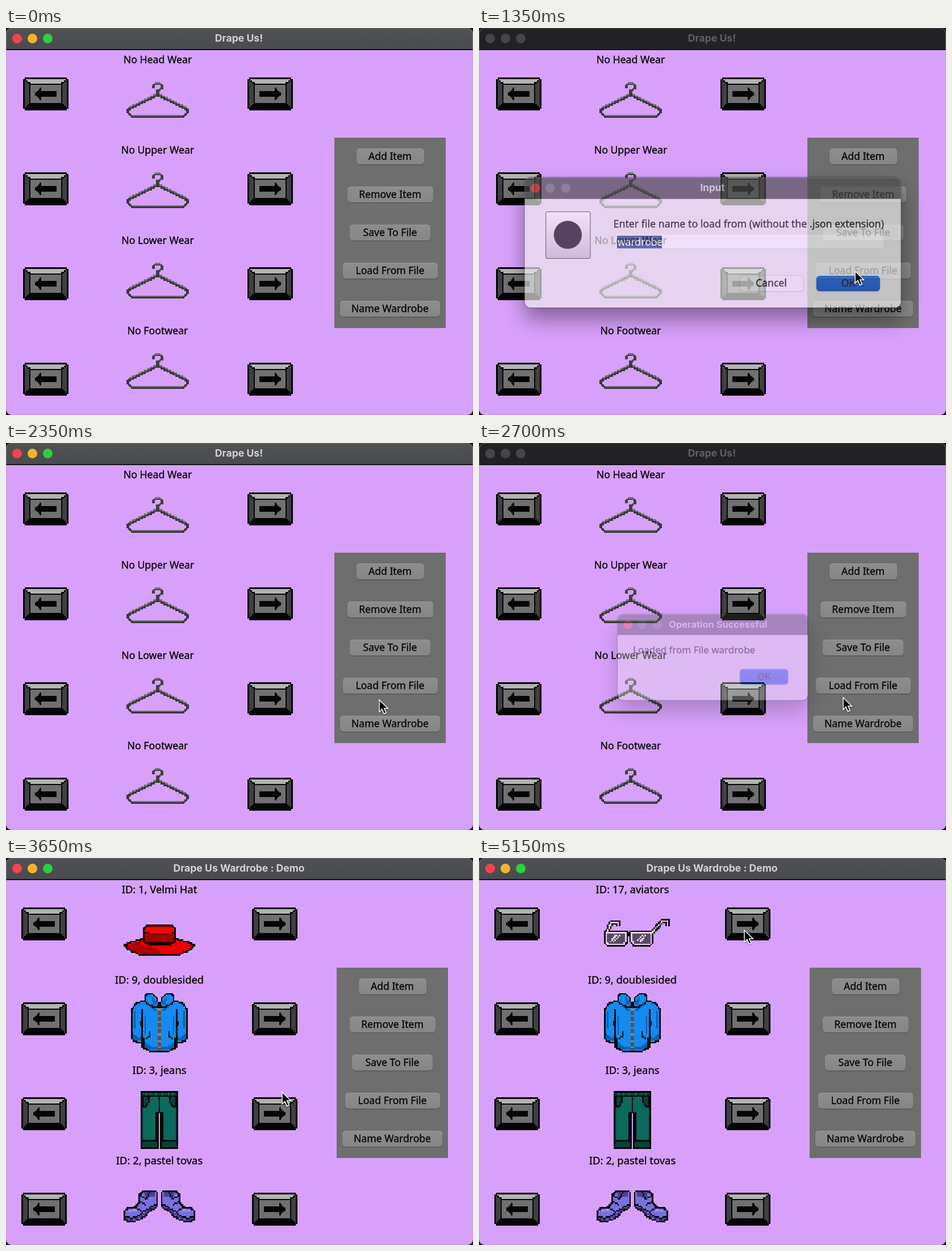
Recreate the animation shown at these times as an HTML page with a canvas. Size 822 by 681 pixels, loop 5200 ms.

```html
<!DOCTYPE html>
<html lang="en">
<head>
<meta charset="utf-8">
<title>Wardrobe</title>
<style>
html, body { margin: 0; width: 100%; height: 100%; overflow: hidden; background: #17131b; }
div, canvas, svg { position: absolute; box-sizing: border-box; }
#stage { left: 0; top: 0; width: 822px; height: 681px; overflow: hidden; }
#win { inset: 0; border-radius: 10px; overflow: hidden; background: #d7a1fb; }
#win::after { content: ""; position: absolute; inset: 0; border: 1px solid #b4a0c0; border-top-color: #777; border-radius: 10px; opacity: .45; }
canvas { image-rendering: pixelated; }
.text { font-family: "Noto Sans", "Open Sans", sans-serif; line-height: 0; white-space: pre; color: #080808; height: 0; -webkit-text-stroke: .35px; }
.title { font-family: Inter, "Liberation Sans", sans-serif; font-weight: 700; color: #d2d2d4; -webkit-text-stroke: 0; }
.bar { left: 0; top: 0; width: 100%; height: 39px; background: linear-gradient(#505153, #4a4b4d); border-bottom: 2px solid #161418; }
.off { background: #222224; }
.off .title { color: #606063; }
.off .light { background: #464649 !important; }
.light { width: 17px; height: 17px; border-radius: 50%; }
.panel { background: #6e6e6e; }
.btn { border-radius: 6px; background: linear-gradient(#8d8d8d, #868686); box-shadow: 0 1px 1px #4c4c4c, inset 0 1px #999; }
.plain { border-radius: 6px; background: #f3f3f3; box-shadow: 0 0 0 1px #cfcfcf, 0 1px 2px #aaa; }
.main { border-radius: 6px; background: linear-gradient(#0a5de0, #034bcb); box-shadow: 0 1px 2px #8fa9d8; }
.focus { box-shadow: 0 0 0 1.5px #48a4ee; }
.dialog { border-radius: 11px; background: #ececec; box-shadow: 0 0 0 1px rgba(20,20,20,.65), 0 21px 38px rgba(0,0,0,.6); }
.dialog .bar { border-radius: 11px 11px 0 0; background: #4b4b4b; border-bottom: 1px solid #222; box-shadow: inset 0 1px #858585; }
.icon { border: 1.5px solid #333; border-radius: 3px; background: linear-gradient(#fff, #cacaca); }
.field { background: #fff; border-bottom: 1.5px solid #b8dcec; }
</style>
</head>
<body>
<div id="stage"></div>
<script>
const LOOP = 5200, STEP = 50;
const stage = document.getElementById("stage");
const px = n => n + "px";

function box(parent, x, y, w, h, cls = "", background) {
  const el = document.createElement("div");
  el.className = cls;
  Object.assign(el.style, { left: px(x), top: px(y), width: px(w), height: px(h) });
  if (background) el.style.background = background;
  parent.append(el);
  return el;
}

// y is the middle of the capitals.
function text(parent, str, x, y, size = 17.7, align = "center", cls = "") {
  const el = box(parent, align === "center" ? x - 250 : x, y, 500, 0, "text " + cls);
  el.style.fontSize = px(size);
  el.style.textAlign = align;
  el.textContent = str;
  return el;
}

function group(parent) {
  return box(parent, 0, 0, 822, 681);
}

// Rasterises vector layers [path, fill, stroke, width] onto coarse cells.
function sprite(parent, x, y, w, h, layers, mirror = false, cell = 2.64) {
  const el = document.createElement("canvas");
  const cols = el.width = Math.round(w / cell), rows = el.height = Math.round(h / cell);
  Object.assign(el.style, { left: px(x), top: px(y), width: px(w), height: px(h) });
  const ctx = el.getContext("2d");
  const probe = document.createElement("canvas").getContext("2d");
  for (const [d, fill, stroke, width = 3] of layers) {
    const path = new Path2D(d);
    probe.lineWidth = width;
    for (let r = 0; r < rows; r++) for (let c = 0; c < cols; c++) {
      const cx = (c + .5) * w / cols, cy = (r + .5) * h / rows;
      const hit = test => test(cx) || (mirror && test(w - cx));
      const onLine = stroke && hit(v => probe.isPointInStroke(path, v, cy));
      const inside = fill && hit(v => probe.isPointInPath(path, v, cy));
      if (onLine || inside) {
        ctx.fillStyle = onLine ? stroke : fill;
        ctx.fillRect(c, r, 1, 1);
      }
    }
  }
  parent.append(el);
  return el;
}

const K = "#050505";
const KEY = [
  ["M3 0H77V3H80V55H77V58H3V55H0V3H3Z", K],
  ["M4 3H76L67 10H13Z", "#b3b3b3"],
  ["M3 5L11 12V45L3 53Z", "#404040"],
  ["M77 5L69 12V45L77 53Z", "#404040"],
  ["M13 13H67V45H13Z", "#707070"],
  ["M19 29L32 16V25H58V33H32V42Z", K]
];
const HANGER = [
  ["M55 22L6 46Q0 50 3 54L9 60H101L107 54Q110 50 104 46Z", null, "#393939", 5.2],
  ["M55 20L5 45M55 20L105 45M10 58.5H100", null, "#737373", 2.2],
  ["M48 11V5L51 2H59L62 5V11L55 16V22", null, "#414141", 4.4],
  ["M51 2H59", null, "#777", 2.5]
];
const HAT = [
  ["M1 37L10 32L34 25H92L116 32L125 37L114 46L98 53H28L12 46Z", "#ea0000", K],
  ["M6 38L32 29V36L62 44V52H30L14 45Z", "#b00000"],
  ["M35 30L36 8L42 2H85L91 8V30L84 34H42Z", "#a80000", K],
  ["M38 7L43 4H84L89 7V12L82 15H45L38 12Z", "#f00808"],
  ["M37 13L45 16H82L90 13", null, "#5c0000", 2.4]
];
const COAT = [
  ["M24 16L9 20L2 31V82L6 88L18 90L21 86V98L32 105H50V26L36 14Z", "#138bf2", K],
  ["M3 72V82L7 87H17L19 78L11 81ZM23 88V97L33 103H48V98L34 96Z", "#0a62ad"],
  ["M20 32V46L16 60M20 46V86", null, K, 2.8],
  ["M25 42V76M30 22L44 34M6 34V66", null, "#0a62ad", 2.8],
  ["M24 12L28 3H37L46 12L49 26L42 28L28 22Z", "#138bf2", K],
  ["M36 7L43 14L47 26L39 22Z", "#0a62ad"],
  ["M25 84L32 79V71", null, K, 2.7],
  ["M50 28V104", null, "#4b5561", 4.5],
  ["M50 30V33M50 41V44M50 52V55M50 63V66M50 74V77M50 85V88M50 96V99", null, "#8a8378", 2.7]
];
const JEANS = [
  ["M1 1H33V39H29V101H1Z", "#0b695d", K],
  ["M2 3H33V8H2ZM3 88H28V99H3Z", "#06413c"],
  ["M3 30H6V88H3Z", "#07534b"],
  ["M2 9H33M3 88H28", null, K, 2.6],
  ["M3 29L10 26L15 19V9H3Z", "#06413c", K, 2.6],
  ["M8 3V7M18 3V7M28 3V7", null, "#0b695d", 2.5]
];
const SHOES = [
  ["M29 6L34 1H56L60 5V22L57 30L46 36L38 45L26 52L14 55L1 52V36L8 31L20 30L28 20Z", "#7b6fdf", K],
  ["M3 47L14 50L27 46L38 37L48 31L58 25V29L46 34L37 43L25 50L13 53L3 50Z", "#4a4099"],
  ["M35 4H56V10L40 13Z", "#4a4099"],
  ["M31 12L40 14L46 4M29 20L39 25M21 30L31 36M3 46L14 49L27 44L38 35L58 24", null, K, 2.4],
  ["M7 37L18 34L25 38", null, "#a298ff", 3]
];
const FRAME = "M5 25L13 6H26V13M84 25L102 5H111V12M4 24H38V40L34 45H8L4 41ZM50 24H84V41L80 45H54L50 40Z";
const GLASSES = [
  [FRAME, null, K, 7.8],
  ["M4 24H38V40L34 45H8L4 41ZM50 24H84V41L80 45H54L50 40Z", "#594a61"],
  ["M38 27H50", null, K, 7],
  [FRAME, null, "#ead3f5", 2.7],
  ["M11 40L23 28M17 40L29 28M57 40L69 28M63 40L75 28", null, "#d9d0de", 2.4]
];

function lights(parent, x, y, colours) {
  colours.forEach((c, i) => box(parent, x + i * 27.4 - 8.5, y - 8.5, 17, 17, "light", c));
}

function button(parent, label, mid, y, w, h = 28, cls = "btn", size = 17.6) {
  const el = box(parent, mid - w / 2, y, w, h, cls);
  text(el, label, w / 2, h / 2 - 1, size);
}

const win = box(stage, 0, 0, 822, 681);
win.id = "win";
const bar = box(win, 0, 0, 822, 39, "bar");
lights(bar, 19, 18.5, ["#f6434f", "#f6b32b", "#2bd03f"]);
const title = text(bar, "", 410, 18, 17.6, "center", "title");

const keys = [0, 1, 2, 3].map(i => {
  const y = 87 + i * 167.2;
  const left = sprite(win, 30, y, 80, 58, KEY);
  const right = sprite(win, 424.5, y, 80, 58, KEY);
  right.style.transform = "scaleX(-1)";
  return { left, right };
});

const empty = group(win), loaded = group(win);
["No Head Wear", "No Upper Wear", "No Lower Wear", "No Footwear"].forEach((s, i) => {
  text(empty, s, 267, 54.5 + i * 159);
  sprite(empty, 212, 95 + i * 159, 110, 63, HANGER);
});

const headLabel = text(loaded, "", 270, 54.5, 18.4);
["ID: 9, doublesided", "ID: 3, jeans", "ID: 2, pastel tovas"].forEach((s, i) =>
  text(loaded, s, 270, 213.5 + i * 159, 18.4));
const hat = sprite(loaded, 207, 117, 126, 55, HAT);
const glasses = sprite(loaded, 220, 107, 116, 49, GLASSES);
sprite(loaded, 220, 235, 100, 107, COAT, true);
sprite(loaded, 237, 410, 66, 102, JEANS, true);
sprite(loaded, 207, 585, 126, 56, SHOES, true);

const panel = box(win, 578, 193, 196, 335, "panel");
[["Add Item", 119], ["Remove Item", 151], ["Save To File", 142], ["Load From File", 167], ["Name Wardrobe", 176]]
  .forEach(([s, w], i) => button(panel, s, 98, 18.5 + i * 67.2, w));

function dialog(x, y, w, h, name, mid) {
  const el = box(stage, x, y, w, h, "dialog");
  const top = box(el, 0, 0, w, 39, "bar");
  lights(top, 19.5, 19.5, ["#f6434f", "#6d6d6d", "#6d6d6d"]);
  text(top, name, mid, 19, 17.6, "center", "title");
  return el;
}

const ask = dialog(68.5, 258.5, 685, 237, "Input", 342);
const icon = box(ask, 38, 62, 82, 86, "icon");
box(icon, 14, 16, 51, 51, "", "#151515").style.borderRadius = "50%";
text(ask, "Enter file name to load from (without the .json extension)", 161.5, 84, 18.4, "left");
const field = box(ask, 166, 104, 487, 26, "field");
box(field, 2, 1.5, 82, 23, "", "#28497a");
text(field, "wardrobe", 3, 12.5, 18.2, "left").style.color = "#fff";
button(ask, "Cancel", 449, 179, 115, 28, "plain", 18.2);
button(ask, "OK", 589, 179, 116, 28, "main", 18.2);

const done = dialog(231.5, 295.5, 359, 162, "Operation Successful", 189.5);
text(done, "Loaded from File wardrobe", 29, 66, 18.2, "left");
button(done, "OK", 276, 104, 90, 28, "main focus", 18.2);

stage.insertAdjacentHTML("beforeend",
  `<svg id="cursor" width="24" height="34" viewBox="-3 -3 24 34" style="filter:drop-shadow(0 1px 1px #0007)">
  <path d="M0 0V21L4.9 16.4L8.3 24.4L12 22.8L8.6 15H15.2Z" fill="#000" stroke="#fff" stroke-width="1.5"/></svg>`);
const cursor = document.getElementById("cursor");

// time, x, y
const PATH = [
  [0, 845, 690], [250, 845, 690], [750, 672, 482], [900, 663, 457], [1100, 662, 428],
  [1450, 662, 428], [1800, 663, 463], [2200, 663, 463], [2350, 657, 452],
  [2750, 640, 448], [3150, 487, 421], [3600, 487, 421], [4150, 461, 56],
  [4350, 461, 56], [4700, 467, 127], [5200, 467, 127]
];
const smooth = u => u * u * (3 - 2 * u);
const clamp = u => Math.max(0, Math.min(1, u));

function cursorAt(t) {
  const i = Math.max(1, PATH.findIndex(p => p[0] > t));
  const [t0, x0, y0] = PATH[i - 1], [t1, x1, y1] = PATH[i];
  const u = smooth((t - t0) / (t1 - t0));
  return [x0 + (x1 - x0) * u, y0 + (y1 - y0) * u];
}

function show(el, on) {
  el.style.display = on ? "" : "none";
}

// Opens with a short zoom and fades out.
function pop(el, t, from, to) {
  const a = clamp((t - from + STEP) / 150), b = clamp((to + 100 - t) / 100);
  show(el, t >= from && b > 0);
  el.style.opacity = Math.min(a, b);
  el.style.transform = a < 1 ? `scale(${.9 + .1 * a})` : "none";
}

function draw(t) {
  const full = t >= 3600, swapped = t >= 4850;
  bar.classList.toggle("off", (t >= 1300 && t < 2250) || (t >= 2700 && t < 3550));
  title.textContent = full ? "Drape Us Wardrobe : Demo" : "Drape Us!";
  show(empty, !full);
  show(loaded, full);
  show(hat, !swapped);
  show(glasses, swapped);
  headLabel.textContent = swapped ? "ID: 17, aviators" : "ID: 1, Velmi Hat";
  for (const k of keys) {
    k.left.style.left = px(full ? 27 : 30);
    k.right.style.left = px(full ? 432.5 : 424.5);
  }
  panel.style.left = px(full ? 582 : 578);
  pop(ask, t, 1300, 2200);
  pop(done, t, 2700, 3500);
  const [x, y] = cursorAt(t);
  cursor.style.left = px(x - 3);
  cursor.style.top = px(y - 3);
}

const start = performance.now();
function tick() {
  const t = (performance.now() - start) % LOOP;
  draw(Math.floor(t / STEP) * STEP);
  requestAnimationFrame(tick);
}
tick();
</script>
</body>
</html>
```
